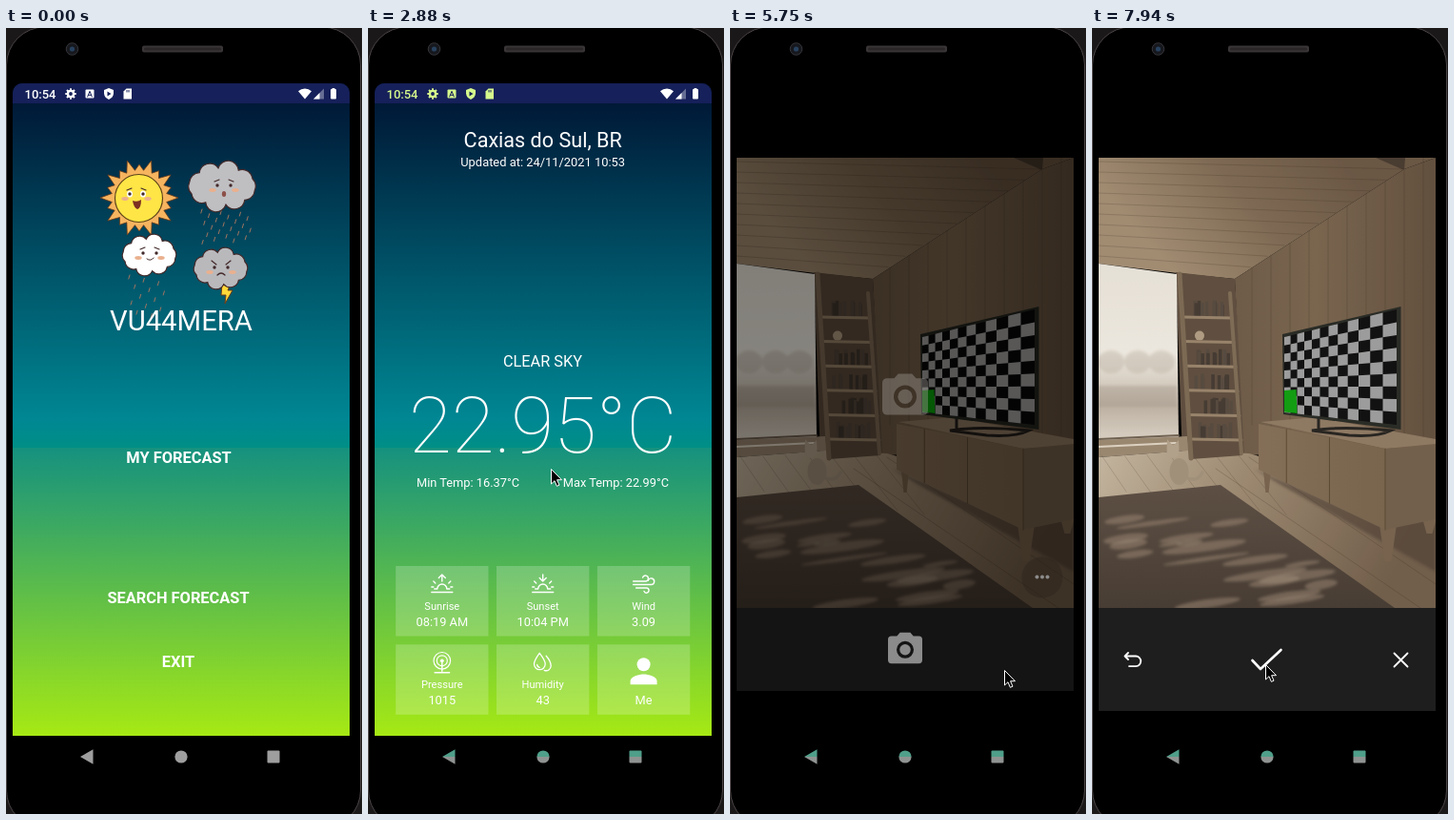
Recreate the animation shown at these times as an HTML page. Size 374x824 px, loop 8000 ms.

```html
<!DOCTYPE html>
<html lang="en">
<head>
<meta charset="utf-8">
<title>Weather app</title>
<style>
html, body { margin: 0; width: 100%; height: 100%; overflow: hidden; background: #000; }
svg { display: block; width: 374px; height: 824px; }
text { font-family: Roboto, "Open Sans", sans-serif; fill: #fff; }
.line { fill: none; stroke: #fff; stroke-linecap: round; stroke-linejoin: round; }
</style>
</head>
<body>
<svg id="stage" viewBox="0 0 374 824" xmlns="http://www.w3.org/2000/svg"></svg>
<script>
const LOOP = 8000, SKIN = '#43292a', SEAM = 'rgba(50,34,20,.22)';

// ---------- helpers ----------
const mix = (a, b, p) => a + (b - a) * p;
const mixPt = (a, b, p) => a.map((v, i) => mix(v, b[i], p));
const polar = (x, y, r, a, ry = r) => [x + r * Math.cos(a), y + ry * Math.sin(a)];
const list = (n, f) => Array.from({ length: n }, (_, i) => f(i));
const times = (n, f) => list(n, f).join('');
let seed = 7;
const rand = () => (seed = seed * 16807 % 2147483647) / 2147483647;

const txt = (s, x, y, size, weight = 400, anchor = 'middle') =>
  `<text x="${x}" y="${y}" font-size="${size}" font-weight="${weight}" text-anchor="${anchor}">${s}</text>`;
const poly = (pts, fill, extra = '') => `<polygon points="${pts}" fill="${fill}" ${extra}/>`;
const rect = (x, y, w, h, fill, extra = '') =>
  `<rect x="${x}" y="${y}" width="${w}" height="${h}" fill="${fill}" ${extra}/>`;
const oval = (x, y, rx, ry, fill, extra = '') =>
  `<ellipse cx="${x}" cy="${y}" rx="${rx}" ry="${ry}" fill="${fill}" ${extra}/>`;
const disc = (x, y, r, fill, extra) => oval(x, y, r, r, fill, extra);
const line = (d, width) => `<path class="line" d="${d}" stroke-width="${width}"/>`;
const ink = (d, color, width = 1) =>
  `<path d="${d}" fill="none" stroke="${color}" stroke-width="${width}" stroke-linecap="round"/>`;
const group = (id, body, extra = '') => `<g id="${id}" ${extra}>${body}</g>`;

const camera = (x, y, scale, fill) =>
  `<g transform="translate(${x} ${y}) scale(${scale}) translate(-12 -11)" fill="${fill}">
   <path fill-rule="evenodd" d="M9 2 7.2 4H4a2 2 0 0 0-2 2v12a2 2 0 0 0 2 2h16a2 2 0 0 0 2-2V6a2 2 0 0 0-2-2h-3.2L15 2zM12 7a5 5 0 0 1 0 10a5 5 0 0 1 0-10z"/>
   <circle cx="12" cy="12" r="3.2"/></g>`;

// ---------- phone ----------
const phone = () => rect(0, 0, 374, 824, '#1b1819') +
  rect(.5, -1, 372, 840, '#000', 'rx="40" stroke="#4b4446"') +
  disc(69.5, 22, 6.3, '#16181d', 'stroke="#35353a"') + disc(69.5, 22, 2.6, '#27415e') +
  rect(143, 18.5, 85, 7, '#393435', 'rx="2"') + rect(145, 20.5, 81, 3, '#2a2627', 'rx="1.5"');

const nav = () => group('nav', '<path d="M78 764l13.5-7.7v15.4z"/><circle cx="184" cy="764" r="6.6"/>' +
  '<rect x="274.5" y="757.5" width="13" height="13" rx="1"/>');

function status() {
  const teeth = times(8, i => rect(67, 63.3, 2, 2.6, 'currentColor', `transform="rotate(${i * 45} 68 69)"`));
  const left = '<text id="clock" x="19.5" y="73.7" font-size="13" font-weight="500" style="fill:currentColor"></text>' +
    teeth + disc(68, 69, 3.1, 'none', 'stroke="currentColor" stroke-width="2.4"') +
    rect(83.5, 64.5, 9, 9, 'currentColor', 'rx="1"') + ink('M85.7 72 88 66.3 90.3 72M86.6 70.3h2.8', '#16205a') +
    '<path d="M108 63l5 2v3.6c0 3-2.2 5.2-5 6.4c-2.800-1.200-5-3.400-5-6.400V65z" fill="currentColor"/>' +
    poly('106.5,66.5 110.5,69 106.5,71.5', '#16205a') +
    '<path d="M126.5 63.5h5.5v11h-8.500v-8z" fill="currentColor"/>' +
    times(2, i => rect(126.5 + i * 2, 65, 1, 2.4, '#16205a'));
  const pin = '<path d="M295 63.5a3.600 3.600 0 0 1 3.600 3.600c0 2.500-3.600 7-3.600 7s-3.600-4.500-3.600-7a3.600 3.600 0 0 1 3.600-3.600z" fill="none" stroke="#fff" stroke-width="1.3"/>' +
    disc(295, 67.2, 1.2, '#fff');
  return rect(7, 58, 354, 21, '#16205a') + group('left', left) + group('pin', pin) +
    '<path d="M307 66.2a10.5 10.5 0 0 1 14 0L314 74.5z" fill="#fff"/>' +
    poly('323,74.5 334,74.5 334,63.5', '#fff', 'opacity=".35"') + poly('323,74.5 329.5,74.5 329.5,68', '#fff') +
    rect(341, 64, 6, 10.5, '#fff', 'rx="1"') + rect(342.6, 63, 2.8, 2, '#fff');
}

// ---------- home ----------
// A ring of round bumps on an ellipse
function cloud(x, y, rx, ry, fill) {
  const n = 10, bump = Math.PI * (rx + ry) / n * .56;
  const pts = list(n, i => polar(x, y, rx * .9, i * 2 * Math.PI / n + .2, ry * .84));
  const d = pts.map((p, i) => `A${bump} ${bump} 0 0 1 ${pts[(i + 1) % n]}`).join('');
  return `<path d="M${pts[0]}${d}Z" fill="${fill}" stroke="${SKIN}" stroke-width="1.2"/>`;
}
const rain = (x, y, w, h, n) => times(n, i => ink(`M${x + (i * .382 % 1) * w} ${y + i / n * h}l-1.2 4`, '#a27560'));
const face = (x, y, brow) => [-1, 1].map(s =>
  disc(x + s * 7, y, 1.7, SKIN) + ink(`M${x + s * 10} ${y - 5 - brow}L${x + s * 5} ${y - 5 + brow}`, SKIN, 1.2) +
  oval(x + s * 12, y + 5, 3.7, 1.9, '#eab08e')).join('');
function sun() {
  const rays = list(40, i => polar(140, 178, i % 2 ? 29 : i % 4 ? 35 : 41, i * Math.PI / 20));
  return poly(rays.join(' '), '#f6b45f', 'stroke="#6b3a1a" stroke-width=".8"') +
    disc(139.5, 178.5, 25, '#ffe545', 'stroke="#5d4318" stroke-width="1.2"') +
    oval(130, 174, 3, 3.6, '#fff') + oval(144, 174, 3, 3.6, '#fff') + face(137, 174, -1) +
    '<path d="M133 181q5 2 9-1q0 9-4 10q-4-2-5-9z" fill="#7d2f22"/>';
}
const home = () => sun() +
  rain(206, 190, 53, 34, 22) + cloud(227, 166, 39, 23, '#bfbfc2') + face(229, 165, -1) + oval(229, 174, 2.2, 3, '#8d5148') +
  rain(130, 259, 40, 44, 13) + cloud(150.5, 238, 31, 20, '#fff') + face(151, 236, -1) + ink('M148 242q4 3 7-1', SKIN) +
  poly('227,268 236,268 233,275 238,275 230,289 231,280 226,280', '#ffd83a', 'stroke="#6b3a1a"') +
  cloud(225.5, 252, 31, 20, '#b9b9bc') + face(226, 251, 2) + ink('M222 259q4-4 8 0', SKIN, 1.3) +
  txt('VU44MERA', 184, 317, 29.3) +
  rect(113, 430, 136, 41, '#fff', 'id="press" rx="3"') +
  txt('MY FORECAST', 181.5, 455.5, 16.4, 700) + txt('SEARCH FORECAST', 181, 602.5, 16.4, 700) + txt('EXIT', 181, 669.5, 16.4, 700);

// ---------- forecast ----------
const sunMark = arrow => line('M-11 9.5h22M-8 6h3a5 5 0 0 1 10 0h3M-9-2l2 2M9-2l-2 2M-11 4h2M11 4h-2M0-9v7' + arrow, 1.4);
const cards = [
  ['Sunrise', '08:19 AM', sunMark('M-3.5-5.5l3.5-3.5l3.5 3.5')],
  ['Sunset', '10:04 PM', sunMark('M-3.5-5.5l3.5 3.5l3.5-3.5')],
  ['Wind', '3.09', line('M-11-2h13a3 3 0 1 0-3-4M-11 1.5h19a3.3 3.3 0 1 0-3.3-4.3M-8 5h11a2.6 2.6 0 1 1-2.6 3.4', 1.4)],
  ['Pressure', '1015', [8.8, 5.5].map(r => disc(0, -1, r, 'none', 'stroke="#fff" stroke-width="1.2"')).join('') +
    disc(0, -1, 1.9, '#fff') + line('M0 0v10M-7.700 11.5h15.500', 1.4)],
  ['Humidity', '43', line('M-3.5-9c4 5 6 8 6 11.5a5.800 5.800 0 0 1-11.700 0c0-3.500 2-6.500 5.700-11.500zM3.500-6c3.500 4 5 7.500 5 10.500a5 5 0 0 1-7 4.500M-6 3a3 3 0 0 0 2.500 3', 1.3)],
  ['', 'Me', disc(0, 3, 7, '#fff') + '<path d="M-14 24v-3.500c0-5 9.300-7.200 14-7.200s14 2.200 14 7.200v3.500z" fill="#fff"/>']
];
const card = ([label, value, icon], i) => {
  const x = 77.8 + i % 3 * 105.9, y = 564 + Math.floor(i / 3) * 82.3;
  return rect(x - 48.7, y, 97.4, 73.5, '#fff', 'opacity=".2"') + `<g transform="translate(${x} ${y + 18})">${icon}</g>` +
    txt(label, x, y + 45.5, 11.1) + txt(value, x, y + 62.5, 12.8);
};
const forecast = () => txt('Caxias do Sul, BR', 183.7, 125, 21.6) + txt('Updated at: 24/11/2021 10:53', 183.7, 145, 12.9) +
  txt('CLEAR SKY', 183.5, 354.5, 16.3) + txt('22.95°C', 183.7, 444.5, 82, 100) +
  txt('Min Temp: 16.37°C', 51, 481, 12.8, 400, 'start') + txt('Max Temp: 22.99°C', 316, 481, 12.8, 400, 'end') +
  cards.map(card).join('');

// ---------- room ----------
function television() {
  const cols = 12, rows = 9;
  const at = (i, j) => {
    const u = i / cols, p = .65 * u / (1 - .35 * u);
    return [mix(202, 320, p), mix(mix(324, 295, p), mix(403, 416, p), j / rows)];
  };
  const cell = k => {
    const i = k % cols, j = Math.floor(k / cols);
    return (i + j) % 2 ? '' : poly([at(i, j), at(i + 1, j), at(i + 1, j + 1), at(i, j + 1)], '#a09f9e');
  };
  return ink('M238 408V421M231 422Q262 417 314 422Q300 429 270 427Z', '#221e1a', 3) +
    poly('200,321 324.5,292 324.5,421 201,405', '#23251e') +
    poly([at(0, 0), at(cols, 0), at(cols, rows), at(0, rows)], '#080808') + times(cols * rows, cell) +
    poly('202,380 214.5,379 215.5,404 202,402.5', '#0aa00a');
}
function shelf() {
  const rail = (a, b, w, color) => ink(`M${a}L${b}`, color, w);
  const boards = times(6, i => {
    const y = 303 + i * 25.6, l = 95 + i * 1.8, r = 147 + i * 2;
    const books = times(12, () => {
      const h = 13 + rand() * 5;
      return rect(l + 7 + rand() * 36, y - h, 3.5, h, rand() < .5 ? '#41362d' : '#54463a');
    });
    return (i === 1 ? disc(113, y - 6, 5, '#b39d82') : books) + ink(`M${l} ${y}L${r} ${y + 1}`, '#9a8369', 3);
  });
  return poly('92,258 146,264 158,448 104,452', '#5d4b3a') + boards +
    rail([92, 258], [104, 451], 5, '#7d6850') + rail([145, 278], [157, 446], 4, '#7f6a52');
}
function cabinet() {
  const leg = (x, y, w, h) => poly([[x, y], [x + w, y], [x + w * .7, y + h], [x + w * .3, y + h]], '#76604a');
  const seam = p => ink(`M${mix(175, 308, p)} ${mix(415, 441, p)}V${mix(463, 526, p)}`, '#59462f');
  return poly('170,462 308,522 361,514 361,570 200,480', '#44362a', 'opacity=".55" filter="url(#soft)"') +
    leg(180, 464, 8, 23) + leg(302, 520, 18, 39) + leg(347, 514, 15, 16) +
    poly('177,413 235,408 361,431 361,438 308,441', '#8f7860') +
    poly('175,415 308,441 308,526 175,463', 'url(#front)') + poly('308,441 361,436 361,515 308,526', '#725d47') +
    [.22, .56, 1].map(seam).join('');
}
function rug() {
  const streak = () => {
    const p = rand(), x = mix(20, 190 + p * 70, rand()), y = mix(497, 604, p);
    return oval(x, y, 12 + rand() * 34, 2 + rand() * 3, '#aa967f', `opacity=".45" transform="rotate(-8 ${x} ${y})"`);
  };
  return poly('7,492 135,479 318,608 7,608', 'url(#pile)') +
    `<g clip-path="url(#rugBox)" filter="url(#soft)">${times(20, streak)}</g>`;
}
const cat = () => ink('M101 472q10 4 15-6', '#a3917a', 3.5) + oval(91.5, 465, 10, 14, '#a3917a') +
  oval(85, 444, 6.5, 7, '#b5a38b') + poly('78.5,442 79,431 85,438 91,432 91.500,442', '#b5a38b');

function room() {
  const ceilingLines = times(10, i => ink(`M7 ${140 + i * 11}L${328 - i * 18} ${148 + i * 11.4}`, SEAM, .9));
  const wallLines = times(10, i => ink(`M${168 + i * 20} ${251 - i * 12.8}V${416 + i * 2}`, SEAM, .9));
  const planks = times(7, i => ink(`M${10 + i * 24} 448l${26 + i * 4} ${38 + i * 4}`, SEAM, .8));
  const trees = [20, 48, 73].map(x => oval(x, 350, 14, 12, '#c3b7a8')).join('');
  return poly('7,136 361,136 328,148 150,263 90,257 7,247', 'url(#ceiling)') + poly('298,136 329,136 328,149', '#44362a') +
    poly('88,256 150,263 162,448 95,452', '#5d4b3a') +
    poly('150,263 328,148 361,136 361,440 160,448', 'url(#wall)') + ceilingLines + wallLines +
    poly('7,247 89,258 91,430 7,434', 'url(#glass)') +
    `<g opacity=".45" filter="url(#soft)">${trees}${rect(7, 375, 82, 22, '#a99c8e')}</g>` +
    poly('7,432 100,428 102,443 7,450', '#9c886f') + ink('M7 431L91 427', '#6f5f4e', 2) + ink('M7 439L88 435', '#e4d8c6', 2) +
    poly('7,450 100,443 165,446 361,500 361,608 7,608', 'url(#floor)') + planks +
    ink('M165 450L361 583M130 462L345 608', SEAM) + shelf() + cat() + rug() + cabinet() + television();
}

// ---------- assembly ----------
const grad = (id, [x1, y1, x2, y2], ...stops) =>
  `<linearGradient id="${id}" gradientUnits="userSpaceOnUse" x1="${x1}" y1="${y1}" x2="${x2}" y2="${y2}">` +
  stops.map(s => s.split(' ')).map(([c, o]) => `<stop offset="${o}" stop-color="${c}"/>`).join('') + '</linearGradient>';
const clip = (id, shape) => `<clipPath id="${id}">${shape}</clipPath>`;

document.getElementById('stage').innerHTML = '<defs>' +
  grad('sky', [0, 79, 0, 742], '#001937 0', '#008793 .5', '#008f86 .544', '#15917f .544', '#a6e914 1') +
  grad('ceiling', [250, 120, 90, 260], '#68533f 0', '#7e6850 .5', '#a48d71 1') +
  grad('wall', [150, 0, 361, 0], '#6d5843 0', '#79634b .4', '#604c39 1') +
  grad('glass', [0, 247, 0, 434], '#eee8dd 0', '#f5f0e6 .5', '#dcd2c4 .68', '#c2b5a5 .8', '#e2d9cb 1') +
  grad('floor', [20, 440, 300, 600], '#c6b69e 0', '#a18c72 .4', '#705b46 1') +
  grad('front', [175, 0, 308, 0], '#846d54 0', '#786249 1') +
  grad('pile', [0, 480, 0, 608], '#5a4b3f 0', '#43372d 1') +
  grad('navTint', [0, 756, 0, 772], '#4f9f8a .5', '#8f9391 .5') +
  '<filter id="soft"><feGaussianBlur stdDeviation="1.6"/></filter>' +
  clip('rugBox', '<polygon points="7,492 135,479 318,608 7,608"/>') +
  clip('photoBox', rect(7, 136, 354, 472, '#000')) +
  clip('screen', '<path d="M7 742V68a10 10 0 0 1 10-10h334a10 10 0 0 1 10 10v674z"/>') +
  clip('above', rect(7, 58, 354, 684, '#000', 'id="aboveBox"')) +
  clip('below', rect(7, 58, 354, 684, '#000', 'id="belowBox"')) + '</defs>' +
  phone() + nav() + '<g clip-path="url(#screen)">' +
  group('app', rect(7, 58, 354, 684, 'url(#sky)') +
    `<g clip-path="url(#above)">${group('home', home())}</g>` +
    group('loading', '<path id="arc" fill="none" stroke="#0b2441" stroke-width="3.6"/>', 'clip-path="url(#below)"') +
    group('forecast', forecast()) + status()) +
  group('splash', rect(7, 58, 354, 684, '#1e1e1e') + group('splashIcon', camera(184, 384, 2.4, '#6c6c70')), 'clip-path="url(#below)"') +
  group('cam', rect(7, 58, 354, 684, '#000') +
    `<g clip-path="url(#photoBox)">${group('photo', room())}</g>` +
    group('finder', disc(328, 576, 21.5, '#4b3c2f', 'opacity=".4"') + times(3, i => disc(322.5 + i * 5.5, 575.5, 2, '#fff')) +
      rect(7, 608, 354, 87, '#252525') + rect(7, 608, 354, 87, '#1d2338', 'id="tint"') + group('shutter', camera(184, 650, 1.8, '#fff'))) +
    group('review', rect(7, 608, 354, 108, '#1e1e1e') +
      line('M38 655l-3.5 3.500l3.500 3.500M35 658.500H46a5.300 5.300 0 0 1 0 10.600H39', 1.8) +
      line('M168.5 663l8.500 9l21.500-20', 2.6) + line('M317.5 655.5l14 14M331.500 655.500l-14 14', 1.8)) +
    rect(7, 58, 354, 684, '#000', 'id="shade"') + group('ghost', camera(184, 384, 2.4, '#a5a09a'))) + '</g>' +
  group('cursor', '<path d="M.5 .5V16L4 12.7L6.400 18.300L9 17.200L6.600 11.700H11.500Z" fill="#000" stroke="#fff" stroke-linejoin="round"/>');

const el = {};
document.querySelectorAll('[id]').forEach(n => el[n.id] = n);

// ---------- motion ----------
const clamp = v => Math.min(1, Math.max(0, v));
const smooth = p => p * p * (3 - 2 * p);
// Progress from 0 to 1 held in n even steps
const steps = (t, from, to, n) => clamp(Math.floor((t - from) / (to - from) * (n - 1) + 1e-6) / (n - 1));
// Point on a Bezier curve with any number of handles
const bezier = (pts, p) => pts.length === 1 ? pts[0] : bezier(pts.slice(1).map((b, i) => mixPt(pts[i], b, p)), p);

const moves = [
  { from: 70, to: 760, n: 10, path: [[352, 806], [192, 451], [192, 451]] },
  { from: 2880, to: 3650, n: 11, path: [[192, 462], [-40, 440], [200, -20], [304, 690]] },
  { from: 3730, to: 4110, n: 6, path: [[312, 690], [345, 680], [291, 673]] },
  { from: 4430, to: 4431, n: 2, path: [[288, 673]] },
  { from: 6210, to: 6520, n: 5, path: [[262, 677], [185, 630], [187, 655]] },
  { from: 7630, to: 7940, n: 5, path: [[190, 657], [208, 671], [182, 667]] }
];

const set = (id, name, value) => el[id].setAttribute(name, value);
const show = (id, on) => set(id, 'display', on ? 'inline' : 'none');

function spinner(t) {
  const u = (t - 880) / 1333, turn = 5 + .162 * (t - 1530);
  const ends = [turn + 265 * smooth(clamp(2 * u - 1)), turn + 4 + 261 * smooth(clamp(2 * u))];
  const [a, b] = ends.map(deg => polar(184, 411, 16.3, deg * Math.PI / 180));
  set('arc', 'd', `M${a}A16.3 16.3 0 ${+(ends[1] - ends[0] > 180)} 1 ${b}`);
}

function render(t) {
  const opening = t >= 4910, full = t >= 5520, preview = t >= 5670, taken = t >= 7320;
  const edge = full ? 58 : opening ? mix(720, 333, steps(t, 4910, 5120, 4) ** 2) : mix(742, 58, steps(t, 1140, 1460, 5) ** 2);
  set('aboveBox', 'height', edge - 58);
  set('belowBox', 'y', edge);
  set('belowBox', 'height', (full ? 716 : 742) - edge);

  show('app', !full);
  show('home', t < 1460);
  set('press', 'opacity', t >= 1140 ? .15 : 0);
  show('loading', t >= 1140 && t < 2020);
  spinner(mix(1140, 1940, steps(t, 1140, 1940, 11)));
  show('forecast', t >= 2020);
  set('forecast', 'transform', `translate(0 ${opening ? -2 : 0})`);

  el.clock.textContent = t < 4660 ? '10:54' : '10:55';
  set('left', 'color', t >= 1140 && !opening ? '#d6f88c' : '#fff');
  show('pin', opening);
  set('nav', 'fill', t < 1140 ? '#9e9e9e' : 'url(#navTint)');

  show('splash', opening && !preview);
  set('splashIcon', 'transform', `translate(0 ${full ? 0 : 26})`);

  const dim = 1 - steps(t, 5670, 5900, 4), press = steps(t, 6680, 6836, 3);
  show('cam', preview);
  show('finder', !taken);
  show('review', taken);
  el.photo.style.filter = taken ? 'blur(.6px) contrast(.92)' : 'none';
  set('shade', 'opacity', dim * .68);
  set('ghost', 'opacity', dim * .6);
  set('tint', 'opacity', press);
  set('shutter', 'opacity', 1 - .8 * press);

  const move = moves.filter(m => t >= m.from).pop();
  show('cursor', !!move);
  if (move) set('cursor', 'transform', `translate(${bezier(move.path, steps(t, move.from, move.to, move.n)).map(Math.round)})`);
}

const start = performance.now();
function tick() {
  render((performance.now() - start) % LOOP);
  requestAnimationFrame(tick);
}
tick();
</script>
</body>
</html>
```
